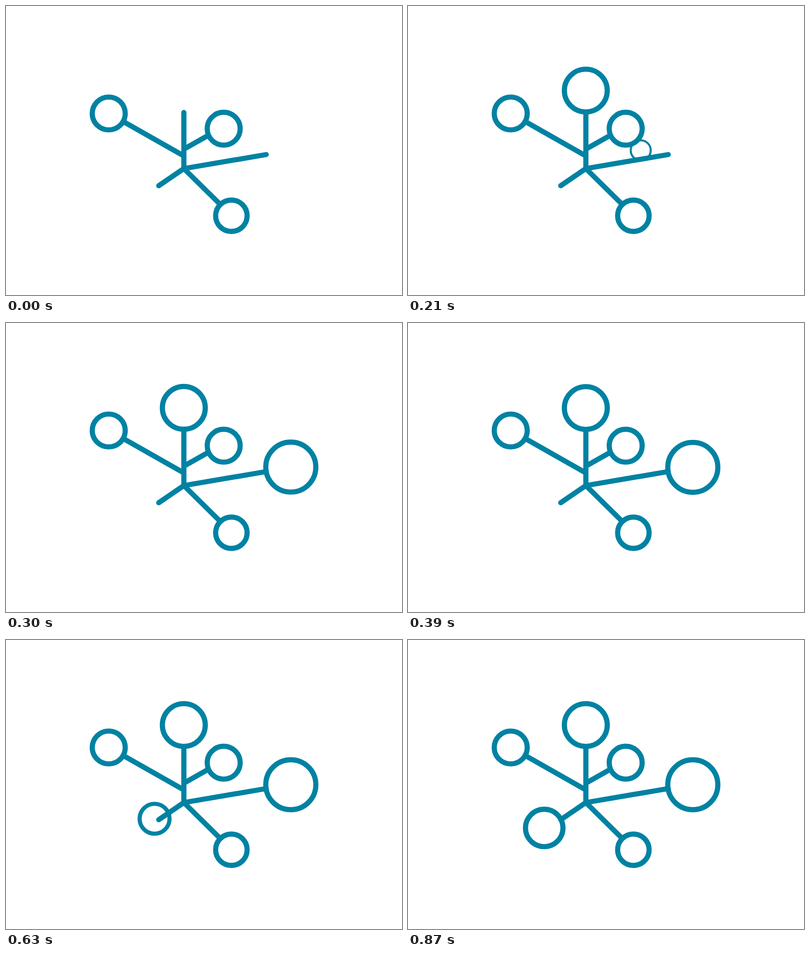
An HTML page for the animation above (8000 ms loop, 875 px wide and 640 px high).

```html
<!DOCTYPE html>
<html lang="en">
<head>
<meta charset="utf-8">
<title>Growing nodes</title>
<style>
  html, body { margin: 0; width: 100%; height: 100%; overflow: hidden; background: #fff; }
  svg { display: block; width: 100vw; height: 100vh; }
</style>
</head>
<body>
<svg viewBox="0 0 875 640" fill="none" stroke="#0082a3" stroke-width="11.4" stroke-linecap="round">
  <path d="M393 235.7V360 M262 257.5L393 332 M393 317L446 287 M393 360L575 329 M393 360L337.5 398 M393 360L472 438"/>
  <circle cx="227" cy="238" r="36.4"/>
  <circle cx="481" cy="271.7" r="36.4"/>
  <circle cx="498" cy="464.5" r="34.8"/>
  <g class="node"><circle cx="392.9" cy="188.3" r="47.4"/></g>
  <g class="node"><circle cx="629.3" cy="320.5" r="55.3"/></g>
  <g class="node"><circle cx="301" cy="416.2" r="41.4"/></g>
</svg>
<script>
const LOOP = 8000, STEP = 30, GROW = 150, SETTLE = 210, LIFT = 1.4;
const CENTER = [437.5, 320];
const starts = [0, 150, 510];
const nodes = document.querySelectorAll('.node');
const clamp = v => Math.min(1, Math.max(0, v));

// Each node grows out of the stage centre, then sinks slightly into place.
function draw(time) {
  const t = Math.floor(time / STEP + 1e-6) * STEP;
  nodes.forEach((node, i) => {
    const age = t - starts[i];
    const scale = clamp(age / GROW);
    const lift = LIFT * (1 - clamp((age - GROW) / SETTLE));
    const [x, y] = CENTER;
    node.setAttribute('visibility', scale ? 'visible' : 'hidden');
    node.setAttribute('transform',
      `translate(${x} ${y}) scale(${scale}) translate(${-x} ${-y - lift})`);
  });
}

function tick() {
  draw(performance.now() % LOOP);
  requestAnimationFrame(tick);
}
draw(0);
requestAnimationFrame(tick);
</script>
</body>
</html>
```
